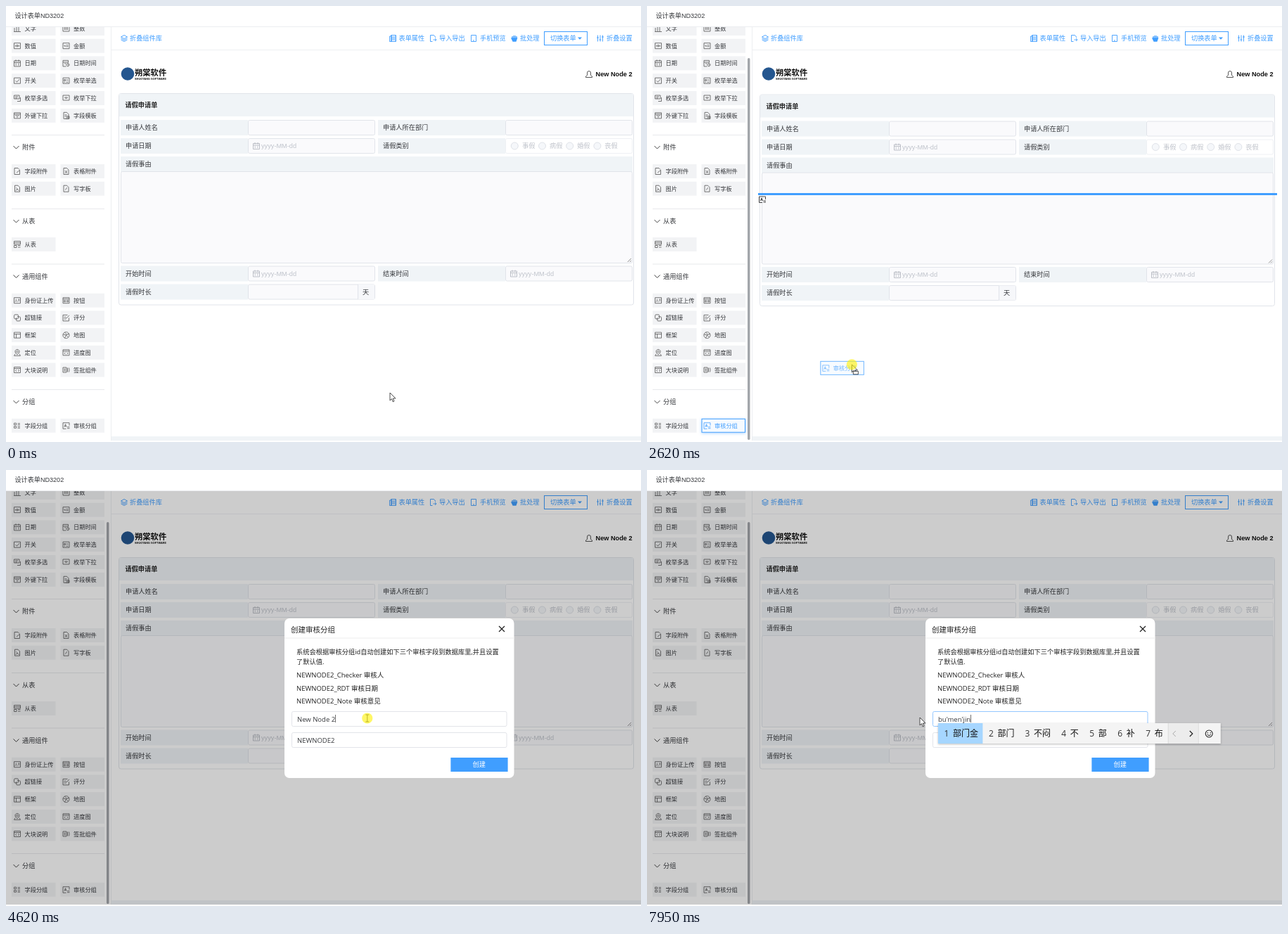
Animation of 903 by 620 pixels, one loop 8 s. Source, as an HTML page:

```html
<!DOCTYPE html>
<html lang="zh-CN">
<head>
<meta charset="utf-8">
<style>
  html, body { margin: 0; width: 100%; height: 100%; overflow: hidden; background: #fff; }
  svg { display: block; width: 903px; height: 620px; font-family: "Liberation Sans", "Noto Sans CJK SC", sans-serif; }
  text { white-space: pre; }
  .ui { font-family: "Open Sans", "Noto Sans CJK SC", sans-serif; }
</style>
</head>
<body>
<svg id="stage" viewBox="0 0 903 620"></svg>
<script>
const BLUE = '#409eff', INK = '#36383c', DARK = '#222', PALE = '#f0f4f7', EDGE = '#e1e4ea', LINE = '#e2e4e9', GREY = '#c0c4cc';

// Drawing helpers; text is placed by its vertical centre.
const box = (x, y, w, h, fill, stroke, r = 0) => stroke
  ? `<rect x="${x + .5}" y="${y + .5}" width="${w - 1}" height="${h - 1}" rx="${r}" fill="${fill}" stroke="${stroke}"/>`
  : `<rect x="${x}" y="${y}" width="${w}" height="${h}" rx="${r}" fill="${fill}"/>`;
const text = (x, y, s, size = 9.2, fill = INK, more = '') =>
  `<text x="${x}" y="${y + size * .37}" font-size="${size}" fill="${fill}" ${more}>${s}</text>`;
const path = (x, y, d, stroke = '#555', width = .9, fill = 'none') =>
  `<path transform="translate(${x} ${y})" d="${d}" fill="${fill}" stroke="${stroke}" stroke-width="${width}"/>`;
const group = (id, body, more = '') => `<g id="${id}" ${more}>${body}</g>`;

// Icons live in a 10 x 10 box.
const FRAME = 'M.5 1H9.5V9H.5Z', PAGE = 'M1.5.5H6L8.5 3V9.5H1.5Z', CODE = FRAME + 'M.5 3H9.5M4 4.5 2.5 6 4 7.5M6 4.5 7.5 6 6 7.5';
const CHECKER = 'M9.5 5V1H.5V9.5H5M2.5 7 4 3 5.5 7M3 5.7H5M6.5 7H10M6.5 9H10';
const CALENDAR = 'M.5 1.5H9.5V9.5H.5ZM.5 4H9.5M3 0V2.5M7 0V2.5M2.5 5.7H4M6 5.7H7.5M2.5 7.5H4M6 7.5H7.5';

const rows = [
  [32, '文字', 'M1 9V4M4 9V2M7 9V3M0 9.5H10', '整数', FRAME + 'M3 3V7M5 3V7M7 3V7'],
  [56.7, '数值', FRAME + 'M2.5 4V6M4 4H6V6H4ZM7.5 4V6', '金额', FRAME + 'M2 4 3.5 6V4M5 4H8M5 6H8'],
  [81.4, '日期', CALENDAR, '日期时间', 'M5 9.5H.5V1H8V4M.5 3.5H8M2.5 5.5H5M7.5 5A2 2.2 0 1 1 7.4 5M7.5 6V7.5H9'],
  [106.2, '开关', FRAME + 'M2.5 5 4.5 7 8 3', '枚举单选', FRAME + 'M2 3.5H4V5H2ZM5 4H8M2 7H3.5M5 7H8'],
  [131, '枚举多选', 'M.5 1H8V6H.5ZM2 3H6M2 5H5M5 9.5H9.5V4', '枚举下拉', 'M.5 1H9.5V8H.5ZM3 4H7L5 6Z'],
  [155.8, '外键下拉', FRAME + 'M.5 3H9.5M2 5H8M4 7H6', '字段模板', PAGE + 'M3 4H6M3 6H9.5V9.5H4M5 7.5H9'],
  [235, '字段附件', 'M8.5 4V9.5H1V.5H6L8 2.5M4 7 9 3', '表格附件', PAGE + 'M3.5 4 6.5 8M6.5 4 3.5 8'],
  [259.7, '图片', PAGE + 'M3 8 5 5 7 8M3 4H4', '写字板', PAGE + 'M4 7 6 3.5'],
  [339, '从表', 'M.5.5H9.5V5H.5ZM.5 2.7H9.5M.5 6.5H4V9.5H.5ZM6 6.5H9.5M6 9H9.5'],
  [418.7, '身份证上传', FRAME + 'M2 7Q3.3 3 5 7M6 3.5H8.5M6 5.5H8.5M2.7 3.5H4', '按钮', FRAME + 'M.5 3H9.5M2 5H4V7H2ZM6 5H8V7H6Z'],
  [443.4, '超链接', 'M2 .5H5A1.5 1.5 0 0 1 6.5 2V5A1.5 1.5 0 0 1 5 6.5H2A1.5 1.5 0 0 1 .5 5V2A1.5 1.5 0 0 1 2 .5M5 3.5H8A1.5 1.5 0 0 1 9.5 5V8A1.5 1.5 0 0 1 8 9.5H5A1.5 1.5 0 0 1 3.5 8V5', '评分', 'M7 1H.5V9.5H9V5M2 4H5M2 6.5H5M5 6 9.5 1.5'],
  [468.1, '框架', FRAME + 'M.5 3.5H9.5M3.5 3.5V9', '地图', 'M5 .5A4.5 4.5 0 1 1 4.9.5M1 4Q5 6 9 3M3 9 5 5 8 8M3 1 6 4'],
  [492.8, '定位', 'M5 8Q1 5 2 2.5Q5-1.5 8 2.5Q9 5 5 8M5 2.5A1.3 1.3 0 1 1 4.9 2.5M2 7 .5 9.5H9.5L8 7', '进度图', CODE],
  [517.5, '大块说明', CODE, '签批组件', 'M.5 1.5H5.5V8.5H.5ZM2 3.5H4M2 5H4M2 6.5H4M7 2V8M9 2Q10 5 9 8'],
  [596.7, '字段分组', 'M.5 1.5H3.5V4H.5ZM.5 6H3.5V8.5H.5ZM5.5 2H9M5.5 4H9M5.5 6.5H9M5.5 8.5H9', '审核分组', CHECKER]
];

const tile = (x, y, label, icon, hot) =>
  box(x, y - 10, 62.5, 20, hot ? '#f5faff' : '#f2f3f5', hot && BLUE) +
  path(x + 3, y - 5, icon, hot ? BLUE : '#555', .8) + text(x + 18.5, y, label, 8.2, hot ? BLUE : INK);

const section = (y, label) => box(8, y - 18, 132, 1, '#e8e9ec') +
  path(10.5, y - 2, 'M0 0 4 4 8 0', '#444', 1) + text(23, y, label);

const sidebar = '<clipPath id="below"><path d="M0 30H149V618H0Z"/></clipPath>' + group('tiles',
  rows.map(([y, a, ia, b, ib]) => tile(8, y, a, ia) + (b ? tile(77.5, y, b, ib) : '')).join(''),
  'clip-path="url(#below)"') +
  [[201, '附件'], [306, '从表'], [384.5, '通用组件'], [563, '分组']].map(s => section(...s)).join('');

const tools = [
  [163, 176, '折叠组件库', 'M5 .5 9.5 3 5 5.5 .5 3ZM.5 5 5 7.5 9.5 5M.5 7 5 9.5 9.5 7'],
  [545, 558.5, '表单属性', 'M.5 2H2.5V.5H9.5V9.5H.5ZM2.5 2V9.5M4 3H8M4 5H8M4 7H8M3.3 1V9M9 1V9'],
  [602.5, 616, '导入导出', 'M8 4V3L6 .5H1V9.5H4M5 7H9.5M7.5 5 9.5 7 7.5 9'],
  [660, 674, '手机预览', 'M1.5 .5H8.5V9.5H1.5ZM4 8H6'],
  [840, 854, '折叠设置', 'M1.5 .5V9.5M5 .5V9.5M8.5 .5V9.5M0 4H3M3.5 7H6.5M7 3H10']
].map(([ix, x, s, d]) => path(ix, 41, d, BLUE) + text(x, 46, s, 9.2, BLUE)).join('') +
  path(718, 41, 'M2 5V2M4 5V1M6 5V1M8 6V2M1 5 3 9H7L8.5 5Z', BLUE, 1.3, BLUE) + text(731, 46, '批处理', 9.2, BLUE) +
  box(765, 36, 62, 20, '#fff', BLUE) + text(774, 46, '切换表单', 9.2, BLUE) + path(813, 44.5, 'M0 0H6L3 3.3Z', 'none', 0, BLUE);

const brand = '<circle cx="173" cy="96.5" r="9.3" fill="#24568f"/>' +
  text(183, 94.5, '朔棠软件', 11.3, '#111', 'font-weight="900"') +
  text(183, 103.5, 'SHUOTANG SOFTWARE', 3.9, '#111', 'font-weight="700"');

const label = (x, y, s, w = 181) => box(x, y - 11, w, 22, PALE) + text(x + 7, y, s);
const input = (x, y, w = 181) => box(x, y - 11, w, 22, '#fafafc', EDGE, 2);
const date = (x, y) => input(x, y) + path(x + 7, y - 5, CALENDAR, '#aeb2ba', .8) + text(x + 19, y, 'yyyy-MM-dd', 9.2, GREY);
const radios = ['事假', '病假', '婚假', '丧假'].map((s, i) =>
  `<circle cx="${723.3 + i * 39.2}" cy="199" r="5" fill="#f5f7fa" stroke="#dfe2e8"/>` +
  text(734 + i * 39.1, 199, s, 9.2, GREY, 'font-weight="500"')).join('');

const form = box(160, 124, 733, 301.5, '#fff', EDGE, 3) + box(161, 125, 731, 32, PALE) +
  text(169.5, 141, '请假申请单', 9.2, DARK, 'font-weight="700"') +
  label(163, 173, '申请人姓名') + input(344, 173) + label(529, 173, '申请人所在部门') + input(710, 173) +
  label(163, 199, '申请日期') + date(344, 199) + label(529, 199, '请假类别') + box(710, 188, 181, 22, '#fff', '#eef0f4', 2) + radios +
  label(163, 225, '请假事由', 728) + box(163, 235, 728, 131, '#fafafc', EDGE, 2) +
  path(884, 359, 'M0 5 5 0M3 5 5 3', '#777', .8) +
  label(163, 380.5, '开始时间') + date(344, 380.5) + label(529, 380.5, '结束时间') + date(710, 380.5) +
  label(163, 406.5, '请假时长') + input(344, 406.5) + box(500, 396, 24, 21, '#f6f7fa') + box(500, 396, 1, 21, EDGE) + text(507, 406.5, '天');

const dialog = box(396, 211, 326.5, 227, '#fff', '', 7) +
  text(405, 227, '创建审核分组', 10.5, DARK) + path(701, 222, 'M0 0 8 8M8 0 0 8', DARK, 1.2) + box(396, 238.5, 326.5, 1, '#eee') +
  text(413, 258.5, '系统会根据审核分组id自动创建如下三个审核字段到数据库里,并且设置', 9.25, DARK) + text(413, 272.5, '了默认值.', 9.25, DARK) +
  ['Checker 审核人', 'RDT 审核日期', 'Note 审核意见'].map((s, i) => text(413, 291.5 + i * 18.6, 'NEWNODE2_' + s, 9.5, DARK)).join('') +
  '<rect id="field" x="406.5" y="343.5" width="305.5" height="21" rx="2" fill="#fff"/>' +
  '<rect id="marked" y="347" height="13" fill="#0078d7"/>' + text(414, 354, '', 9.5, INK, 'id="value"') +
  '<rect id="caret" y="348" width=".7" height="11" fill="#333"/>' +
  box(406, 373, 306.5, 22, '#fff', LINE, 2) + text(414, 384, 'NEWNODE2', 9.5) +
  box(632.4, 409, 81.2, 20, BLUE) + text(663.5, 419, '创建', 9.2, '#fff');

const cursor = group('arrow', path(0, 0, 'M0 0V11L2.5 8.6 4.2 12.8 6 12 4.3 8H8Z', '#222', .8, '#fff') +
    group('carry', path(0, 0, 'M2 9.5H9V14H2Z', '#222', .8, '#fff'))) +
  group('cross', path(0, 0, 'M0-7 2.5-4H1V-1H4V-2.5L7 0 4 2.5V1H1V4H2.5L0 7-2.5 4H-1V1H-4V2.5L-7 0-4-2.5V-1H-1V-4H-2.5Z', '#333', .8, '#fff')) +
  group('beam', path(0, 0, 'M-2.5-5H2.5M0-5V5M-2.5 5H2.5', '#333', .8)) +
  '<circle id="press" r="7.6" fill="#fff200" opacity=".6"/>';

const $ = id => document.getElementById(id);
$('stage').innerHTML = box(0, 0, 903, 620, '#fff') + text(12.5, 13.5, '设计表单ND3202', 9.1) +
  sidebar + group('hot', tile(77.5, 596.7, '审核分组', CHECKER, true), 'style="filter:drop-shadow(0 1px 2px #409eff66)"') +
  group('bar', box(143, 74, 3.5, 543, '#a3a6ab', '', 1.7)) +
  box(0, 29, 903, 1, '#eceef1') + box(149, 30, 1, 588, '#eceef1') + box(150, 62, 753, 1, '#eef0f3') + box(150, 612, 753, 6, PALE) +
  tools + brand + path(824, 92, 'M5 .5Q8 .5 7.5 4Q6.5 7 9.5 8V9.5H.5V8Q3.5 7 2.5 4Q2 .5 5 .5', '#444') +
  text(838.5, 97, 'New Node 2', 9.2, '#111', 'font-weight="700"') +
  group('form', form) + group('drop', box(158, 266, 738, 3, BLUE) + path(159, 270, CHECKER, '#333')) +
  group('shade', box(0, 30, 903, 588, '#000')) +
  group('dialog', dialog, 'class="ui"') + group('ime', '', 'class="ui"') +
  group('ghost', tile(0, 10, '审核分组', CHECKER, true), 'opacity=".75"') + group('cursor', cursor);

// Pointer route: time, x, y.
const route = [[320, 546, 550], [480, 490, 556], [700, 340, 574], [930, 165, 591], [1070, 121, 593], [1290, 117, 594],
  [2010, 117, 594], [2620, 291, 510], [2760, 335, 486], [2930, 342, 482], [3600, 342, 482],
  [4000, 440, 381], [4410, 514, 353], [4620, 514, 353], [5160, 388, 352]];

const typed = [
  [7030, "b", '吧 不 把 被 并 比 别'], [7160, "bu", '不 部 步 布 补 捕 簿'],
  [7360, "bu'm", '部门 不满 不忙 不明 不妙 不免 不美'], [7430, "bu'm", '部门 不满 不 部 布 补 步'],
  [7570, "bu'men", '部门 不闷 不 部 补 布 步'], [7760, "bu'men'j", '部门经理 部门级 部门 部门间 部门将 不闷 不'],
  [7880, "bu'men'ji", '部门级 部门 不闷 不 部 补 布'], [7950, "bu'men'jin", '部门金 部门 不闷 不 部 补 布']];

function pointer(t) {
  const i = route.findIndex(k => k[0] > t);
  if (i < 0) return route.at(-1).slice(1);
  if (!i) return route[0].slice(1);
  const [t0, x0, y0] = route[i - 1], [t1, x1, y1] = route[i], p = (t - t0) / (t1 - t0);
  return [x0 + (x1 - x0) * p, y0 + (y1 - y0) * p];
}

function candidates(words) {
  let x = 414, out = '';
  words.split(' ').forEach((word, i) => {
    const w = 28.3 + 11.7 * word.length;
    if (!i) out += box(x, 360, w, 29, '#a6d6ff');
    out += text(x + 8.5, 374.5, i + 1, 12, '#333') + text(x + 21, 374.5, word, 12, '#111');
    x += w;
  });
  return `<g style="filter:drop-shadow(0 1px 1.5px #0004)">${box(414, 360, x - 339, 29, '#f4f4f4')}</g>` + out +
    box(x, 360, 43, 29, '#ececec') + box(x, 360, 1, 29, '#ddd') + box(x + 43, 360, 1, 29, '#ddd') +
    path(x + 7, 371, 'M4 0 0 4 4 8', '#aaa', 1) + path(x + 31, 371, 'M0 0 4 4 0 8', '#222', 1.2) +
    path(x + 58.5, 375, 'M0-5A5 5 0 1 1-.1-5M-2.5 1Q0 4 2.5 1M-2-2V-.5M2-2V-.5', '#222', 1.1);
}

const show = (id, on) => $(id).style.display = on ? '' : 'none';
const set = (id, name, v) => $(id).setAttribute(name, v);

function editField(t, x) {
  const entry = typed.findLast(e => e[0] <= t), value = $('value');
  const s = entry ? entry[1] : 'New Node 2', focused = t >= 4690;
  value.textContent = s;
  const end = 414 + value.getComputedTextLength();
  const edge = i => value.getStartPositionOfChar(i).x;
  let from = s.length;
  if (!entry && t > 4620) while (from > 0 && edge(from - 1) + 2 > x) from--;
  const marking = from < s.length;
  if (marking) {
    const left = edge(from);
    set('marked', 'x', left);
    set('marked', 'width', end - left);
    value.innerHTML = s.slice(0, from) + `<tspan fill="#fff">${s.slice(from)}</tspan>`;
  }
  show('marked', marking);
  show('caret', t >= 4620 && !marking);
  set('caret', 'x', end);
  set('field', 'stroke', focused ? '#94c7ff' : LINE);
  show('ime', entry);
  $('ime').innerHTML = entry ? candidates(entry[2]) : '';
}

function draw(t) {
  const [x, y] = pointer(t), inside = (l, r, top, bottom) => x > l && x < r && y > top && y < bottom;
  const dragging = t > 2010 && t < 2930, placing = dragging && x > 157, open = t >= 3190;
  const onTile = t < 2010 && inside(78, 140, 587, 607);
  const onField = t > 3640 && (inside(406, 712, 343, 365) || inside(406, 712, 373, 395));

  show('bar', t > 930);
  show('hot', t > 1000 && !open);
  show('drop', placing);
  set('form', 'transform', `translate(0 ${placing ? 1.5 : 0})`);
  show('ghost', dragging);
  set('ghost', 'transform', `translate(${x - 45} ${y - 5})`);

  // The dialog settles from a larger size while it fades in.
  const rest = Math.pow(1 - Math.min(1, Math.max(0, (t - 3190) / 450)), 2.5);
  show('shade', open);
  show('dialog', open);
  set('shade', 'opacity', .2 * (1 - rest));
  set('dialog', 'opacity', Math.max(0, 1 - 2.5 * rest));
  set('dialog', 'transform', `translate(559 324.5) scale(${1 + .3 * rest}) translate(-559 -324.5)`);
  editField(t, x);

  set('cursor', 'transform', `translate(${x} ${y})`);
  show('cross', onTile);
  show('beam', onField);
  show('arrow', !onTile && !onField);
  show('carry', dragging);
  show('press', t >= 1610 && t < 2930 || t >= 4620 && t < 5360);
}

function tick() {
  draw(performance.now() % 8000);
  requestAnimationFrame(tick);
}
tick();
</script>
</body>
</html>
```
